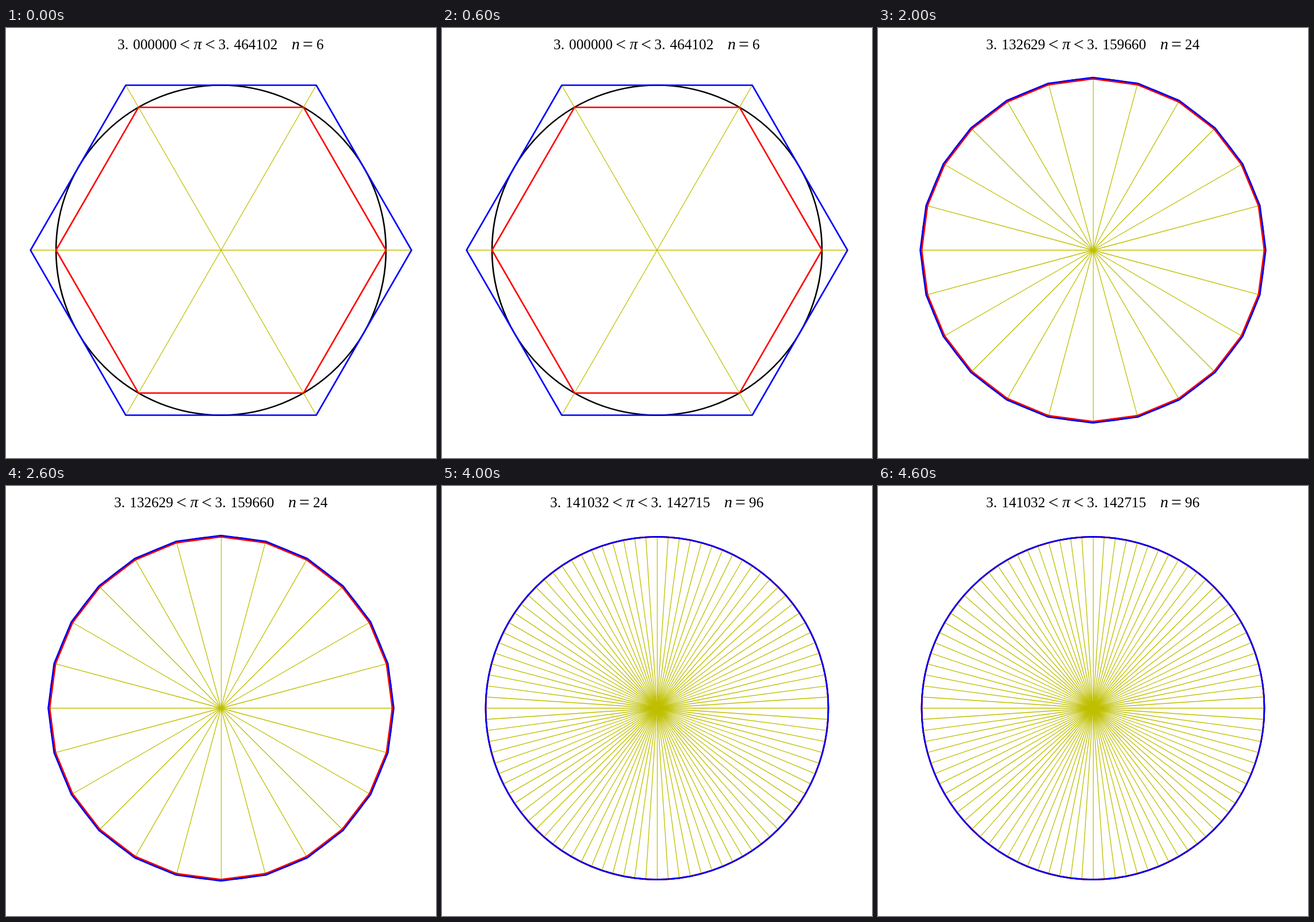
Animation, 748 px wide and 748 px high, one loop 5000 ms. Source, as an HTML page with a canvas:

```html
<!DOCTYPE html>
<html lang="en">
<head>
<meta charset="utf-8">
<title>Bounding pi with polygons</title>
<style>
html, body { margin: 0; width: 100%; height: 100%; overflow: hidden; background: #fff; }
canvas { display: block; }
</style>
</head>
<body>
<canvas id="stage" width="748" height="748"></canvas>
<script>
const ctx = document.getElementById('stage').getContext('2d');
const CX = 374, CY = 386.5, TAU = 2 * Math.PI;
const STEP = 1000, STEPS = 5;

function stroke(color, width) {
  ctx.strokeStyle = color;
  ctx.lineWidth = width;
  ctx.stroke();
}

function polygon(n, r, color) {
  ctx.beginPath();
  for (let i = 0; i < n; i++) {
    const a = TAU * i / n;
    ctx.lineTo(CX + r * Math.cos(a), CY - r * Math.sin(a));
  }
  ctx.closePath();
  stroke(color, 2.6);
}

function spokes(n, r) {
  for (let i = 0; i < n; i++) {
    const a = TAU * i / n;
    // keep vertical spokes crisp on the pixel grid
    const x = CX + (i * 4 % n === 0 && i * 2 % n !== 0 ? 0.5 : 0);
    ctx.beginPath();
    ctx.moveTo(x, CY);
    ctx.lineTo(x + r * Math.cos(a), CY - r * Math.sin(a));
    stroke('#bfbf00', 1.3);
  }
}

function write(text, x, size = 25.3, style = '', align = 'left', y = 36.5) {
  ctx.font = `${style} ${size}px "Liberation Serif", serif`;
  ctx.textAlign = align;
  ctx.fillText(text, x, y);
}

function title(n) {
  const shift = n > 9 ? -6 : 0;
  const number = (value, x) => {
    const [whole, decimals] = value.toFixed(6).split('.');
    write(whole + '.', x + shift);
    write(decimals, x + 27 + shift);
  };
  const sign = (s, x) => write(s, x + shift, 32, '', 'center', 38.5);
  const letter = (s, x) => write(s, x + shift, 28, 'italic', 'center');

  ctx.fillStyle = '#000';
  number(n * Math.sin(Math.PI / n), 194);
  sign('<', 311);
  letter('π', 333.5);
  sign('<', 355);
  number(n * Math.tan(Math.PI / n), 369.5);
  letter('n', 504);
  sign('=', 525);
  write(String(n), 540 + shift);
}

function draw(step) {
  const n = 6 * 2 ** step;
  const r = step ? 298 : 287;
  const outer = r / Math.cos(Math.PI / n);
  ctx.fillStyle = '#fff';
  ctx.fillRect(0, 0, 748, 748);
  ctx.lineJoin = 'round';

  ctx.beginPath();
  ctx.arc(CX, CY, r, 0, TAU);
  stroke('#000', 2.6);
  spokes(n, outer);
  polygon(n, r, '#f00');
  polygon(n, outer, '#00f');
  title(n);
}

function tick() {
  draw(Math.floor(performance.now() / STEP) % STEPS);
  requestAnimationFrame(tick);
}
tick();
</script>
</body>
</html>
```
